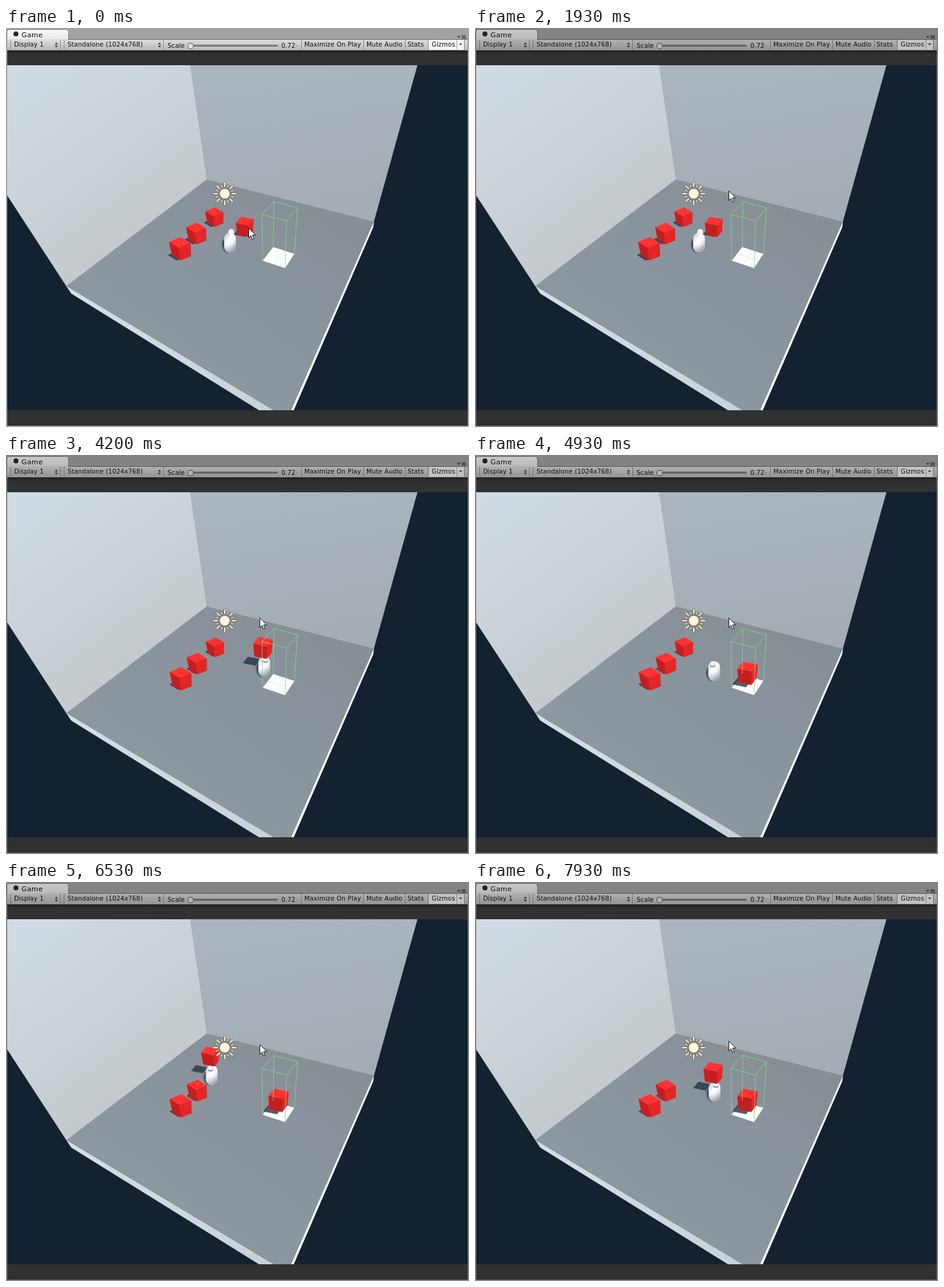
Recreate the animation shown at these times as an HTML page with a canvas. Size 745x643 px, loop 8000 ms.

```html
<!DOCTYPE html>
<html>
<head>
<meta charset="utf-8">
<style>
html, body { margin: 0; overflow: hidden; background: #828282; }
canvas { display: block; }
</style>
</head>
<body>
<canvas id="stage" width="745" height="643"></canvas>
<script>
const c = document.getElementById('stage').getContext('2d');
const LOOP = 8000, START = 2870, PLAY = 1070;
const RED = ['#ff3333', '#c21f20', '#e32627'], SHADE = 'rgba(36,48,70,.78)';

// Robot route: time, x, y
const route = [
  [START, 360.5, 346], [3670, 364, 342], [3950, 397, 328], [4200, 415.5, 341], [4350, 417, 349],
  [4750, 396, 361], [5300, 362, 322], [5800, 342, 321], [6800, 327, 308], [7130, 343, 304], [7930, 385.5, 338]];
const PLATE = [438.5, 352];
const cubes = [
  { x: 337, y: 310, yaw: 51, push: 5600, pick: 6300 },
  { x: 385.5, y: 325.5, yaw: 22, pick: 3800, drop: 4350 },
  { x: 308, y: 336.5, yaw: 51 },
  { x: 282, y: 361, yaw: 51 }];

const ramp = (t, a, b) => Math.min(1, Math.max(0, (t - a) / (b - a)));
const mix = (a, b, p) => a + (b - a) * p;

function robotAt(t) {
  const i = route.findIndex(k => k[0] > t);
  const b = route.at(i), a = i > 0 ? route[i - 1] : b;
  const p = a === b ? 0 : ramp(t, a[0], b[0]);
  return [mix(a[1], b[1], p), mix(a[2], b[2], p)];
}
function poly(fill, ...pts) {
  c.beginPath();
  for (let i = 0; i < pts.length; i += 2) c.lineTo(pts[i], pts[i + 1]);
  c.closePath();
  c.fillStyle = fill;
  c.fill();
}
function rect(fill, x, y, w, h) {
  c.fillStyle = fill;
  c.fillRect(x, y, w, h);
}
function disc(fill, x, y, rx, ry = rx, turn = 0) {
  c.beginPath();
  c.ellipse(x, y, rx, ry, turn, 0, 7);
  c.fillStyle = fill;
  c.fill();
}
function line(color, w, x0, y0, x1, y1) {
  c.beginPath();
  c.moveTo(x0, y0);
  c.lineTo(x1, y1);
  c.strokeStyle = color;
  c.lineWidth = w;
  c.stroke();
}
function fade(x0, y0, x1, y1, ...colors) {
  const g = c.createLinearGradient(x0, y0, x1, y1);
  colors.forEach((v, i) => g.addColorStop(i / (colors.length - 1), v));
  return g;
}
function text(s, x, y, size = 10) {
  c.font = size + 'px "DejaVu Sans", sans-serif';
  c.letterSpacing = size > 10 ? '.4px' : '.15px';
  c.fillStyle = '#0c0c0c';
  c.fillText(s, x, y);
}

function toolbar(t) {
  rect('#a3a3a3', 0, 0, 745, 643);
  c.beginPath();
  c.roundRect(1.5, 2.5, 99, 20, 4);
  c.fillStyle = fade(0, 2, 0, 19, '#fafafa', '#e8e8e8');
  c.fill();
  c.strokeStyle = '#858585';
  c.lineWidth = 1;
  c.stroke();
  disc('#2b2b2b', 16, 9.5, 4);
  text('Game', 25, 15, 11);
  poly('#333', 726, 13, 731, 13, 728.5, 16);
  for (const y of [12, 14, 16]) rect('#333', 733, y, 7, 1);
  rect(fade(0, 18, 0, 36, '#dedede', '#b8b8b8'), 2, 18, 741, 18);
  rect('#6b6b6b', 100, 18, 643, 1);
  rect('#f3f4f6', 680, 19, 58, 16);
  for (const x of [7, 87, 93, 253, 475, 575, 642, 679, 737]) rect('#8c8c8c', x, 19, 1, 16);
  rect('#aaa', 725, 19, 1, 16);
  for (const x of [81, 247]) {
    poly('#333', x - 2.5, 26.5, x + 2.5, 26.5, x, 23.5);
    poly('#333', x - 2.5, 28.5, x + 2.5, 28.5, x, 31.5);
  }
  poly('#444', 729, 25, 734, 25, 731.5, 28);
  rect('#666', 297, 27, 140, 3);
  rect('#999', 298, 28, 138, 1);
  disc('#555', 297, 29, 5);
  disc('#e0e0e0', 297, 29, 4);
  // Play mode tints the editor
  if (t >= PLAY) rect('rgba(0,0,0,.2)', 0, 0, 745, 643);
  text('Display 1', 13, 30);
  text('Standalone (1024x768)', 99, 30);
  text('Scale', 260, 32);
  text('0.72', 443, 32);
  rect('#222', 468, 28, 1, 1);
  text('Maximize On Play', 480, 30);
  text('Mute Audio', 580, 30);
  text('Stats', 646, 30);
  text('Gizmos', 685, 30);
}

function room() {
  rect('#313131', 2, 36, 741, 605);
  rect(fade(0, 36, 0, 42, '#1e1e1e', '#313131'), 2, 36, 741, 6);
  rect('#142131', 2, 60, 741, 556);
  // Each surface reaches under the next one, so no seams show
  poly(fade(400, 60, 440, 290, '#abb5be', '#a4adb4'), 290, 60, 662, 60, 592, 312, 580, 320, 318, 250);
  poly(fade(30, 60, 230, 330, '#d0dbe3', '#cbd3d9', '#c3c9cc'), 2, 60, 296, 60, 323, 244, 323, 250, 105, 420, 97, 416, 2, 270);
  poly(fade(100, 416, 430, 616, '#d5dfe6', '#c9d2d9'), 97, 416, 110, 410, 440, 616, 407, 616, 105, 428);
  poly('#fff', 592, 312, 591, 321, 463, 616, 450, 616, 585, 312);
  poly(fade(460, 270, 280, 520, '#878f96', '#8a949d', '#8c979f'), 323, 244, 592, 312, 459, 616, 430, 616, 97, 416);
  poly('#fcfdfd', 430, 353, 464, 364, 449, 387, 413, 375);
  line('#e9edec', 1, 422, 364, 456, 375);
  line('#e9edec', 1, 447, 358, 431, 381);
}

function cage() {
  const top = [[431, 279.5], [469, 290], [451.5, 311], [412, 300.5]];
  const base = [[430, 352.5], [464, 364], [449, 386.5], [413, 375]];
  top.forEach((p, i) => {
    line('rgba(138,214,140,.85)', 1, ...p, ...top[(i + 1) % 4]);
    line('rgba(138,214,140,.85)', 1, ...p, ...base[i]);
  });
}

function sun() {
  for (const [color, edge] of [['#6a6356', .7], ['#fff4dc', 0]]) {
    for (let i = 0; i < 16; i++) {
      c.save();
      c.translate(352, 267);
      c.rotate(i * Math.PI / 8);
      line(color, (i % 2 ? 1.4 : 2) + edge * 2, 11 - edge, 0, (i % 2 ? 15.5 : 18.5) + edge, 0);
      c.restore();
    }
    disc(color, 352, 267, 8 + edge * 1.5);
  }
}

function cubeAt({ x, y, yaw, push = LOOP, pick = LOOP, drop = LOOP }, t) {
  const fallen = ramp(t, START, START + 140), pushed = ramp(t, push, push + 200);
  const held = ramp(t, pick, pick + 180), dropped = ramp(t, drop, drop + 130);
  const [rx, ry] = robotAt(t);
  const lift = held - .6 * dropped + .1 * (1 - fallen);
  x = mix(mix(x - 1 + fallen - 13 * pushed, rx - 2, held), PLATE[0], dropped);
  y = mix(mix(y - 5 + 5 * fallen - 3 * pushed, ry - 30, held), PLATE[1], dropped);
  return { x, y, lift, yaw: yaw - 29 * pushed, s: 20.5 + .0745 * (y + 40 * lift - 310), over: held > .4 };
}
// The four corners of a tilted square, starting at the far one
function square(x, y, s, yaw) {
  const a = yaw * Math.PI / 180, u = s * Math.cos(a) / 2, v = s * Math.sin(a) / 2;
  return [[x - u + v, y - (u + v) / 2], [x + u + v, y + (v - u) / 2],
    [x + u - v, y + (u + v) / 2], [x - u - v, y + (u - v) / 2]];
}
function shadow({ x, y, s, yaw, lift }) {
  c.filter = 'blur(.6px)';
  poly(SHADE, ...square(x - 3 - lift * 15, y + .43 * s - 1 + lift * 12, s * .95, yaw).flat());
  c.filter = 'none';
}
function drawCube({ x, y, s, yaw }) {
  const lean = (420 - x) * .01;
  const top = square(x - lean, y - .43 * s, s * 1.02, yaw), base = square(x + lean, y + .45 * s, s * .9, yaw);
  poly(RED[0], ...top[0], ...top[1], ...base[1], ...base[2], ...base[3], ...top[3]);
  poly(RED[1], ...top[3], ...top[2], ...base[2], ...base[3]);
  poly(RED[2], ...top[2], ...top[1], ...base[1], ...base[2]);
}

function robot(t) {
  const [x, y] = robotAt(t), loaded = ramp(t, 3700, 4000);
  const kx = x + (robotAt(t + 50)[0] < x ? -2 : 2), ky = y - 18 + 6 * loaded;
  c.filter = 'blur(1px)';
  disc(SHADE, x - 6, y + 5, 6.5, 11, -.25);
  c.filter = 'none';
  line('#e3e8ed', 9, x, y - 8, kx, ky);
  disc('#f7f9fa', kx, ky, 4.5, 4);
  c.beginPath();
  c.roundRect(x - 9.5, y - 16, 19, 32, 9.5);
  c.fillStyle = fade(x - 9, y - 6, x + 9, y + 5, '#d5dce4', '#fff', '#f2f4f6', '#b9c0c8');
  c.fill();
  c.fillStyle = fade(0, y + 2, 0, y + 16, 'rgba(130,143,158,0)', 'rgba(130,143,158,.65)');
  c.fill();
  if (loaded === 1) {
    disc('#8d9bab', kx, ky + 2.5, 4.5, 3.5);
    disc('#f4f6f8', kx, ky, 4.5, 3.5);
  }
}

function pointer(t) {
  if (t >= 870 && t < 1530) return;
  let x, y;
  if (t < 870) {
    const p = ramp(t, 270, 840);
    x = (t < 130 ? 390 : 392) - 41 * p + 45 * Math.sin(Math.PI * p);
    y = 322 - 318 * p ** 1.5;
  } else {
    const p = ramp(t, 1530, 1930);
    x = 394 + 14 * p;
    y = 37 + 225 * p - 2 * ramp(t, 6330, 7130) - 4 * ramp(t, 7200, 7930);
  }
  c.save();
  c.translate(x, y);
  poly('#fff', .5, .5, .5, 16, 4, 12.7, 6.6, 18.5, 9, 17.5, 6.5, 11.8, 11.5, 11.8);
  c.strokeStyle = '#111';
  c.lineWidth = 1;
  c.stroke();
  c.restore();
}

function draw(now) {
  const t = now % LOOP, set = cubes.map(k => cubeAt(k, t));
  toolbar(t);
  room();
  set.forEach(shadow);
  set.filter(k => !k.over).forEach(drawCube);
  robot(t);
  set.filter(k => k.over).forEach(drawCube);
  cage();
  sun();
  pointer(t);
  requestAnimationFrame(draw);
}
requestAnimationFrame(draw);
</script>
</body>
</html>
```
